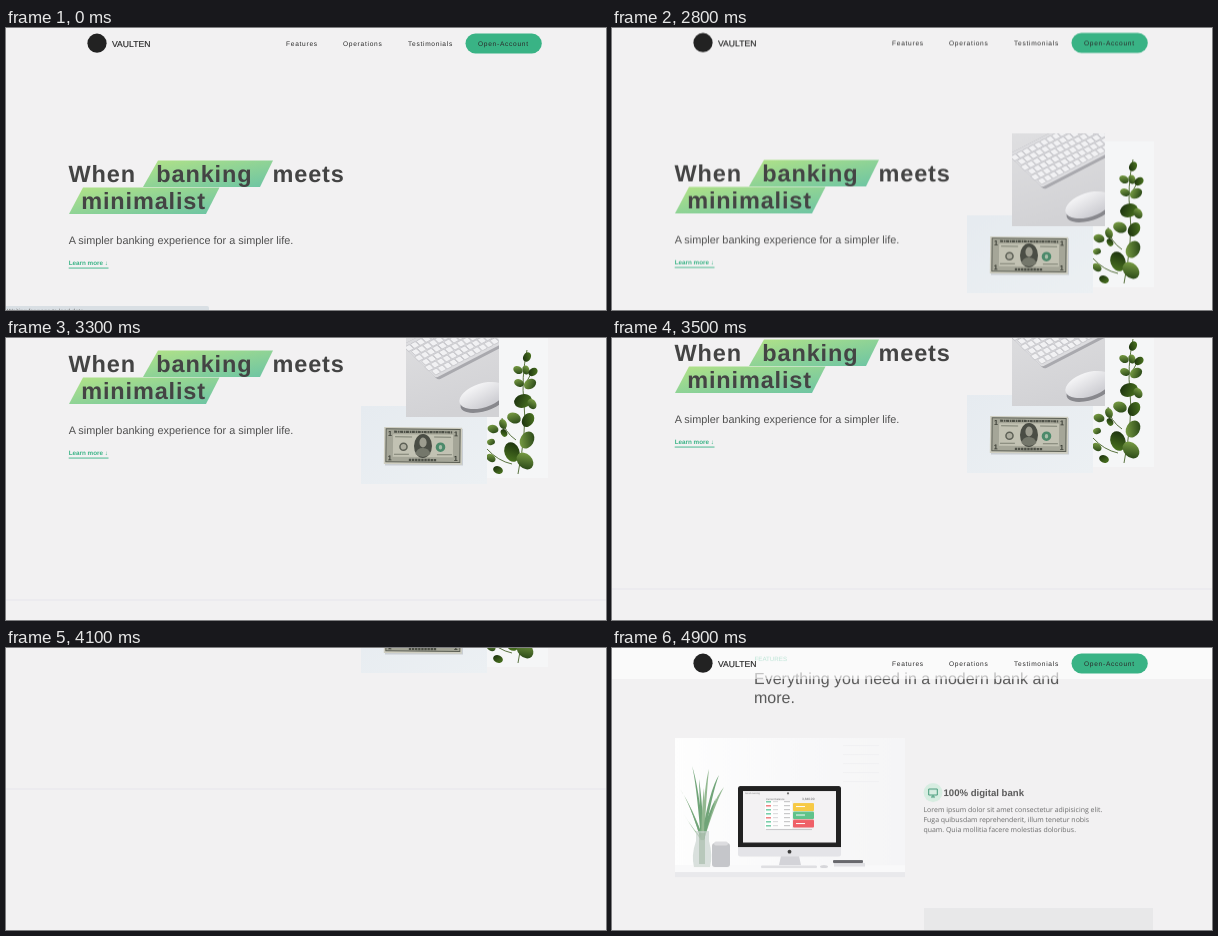
An HTML page for the animation above (5100 ms loop, 600 px wide and 282 px high).

```html
<!DOCTYPE html>
<html lang="en">
<head>
<meta charset="utf-8">
<title>Minimalist banking</title>
<style>
  html, body { margin: 0; width: 100%; height: 100%; overflow: hidden; background: #f2f1f2; }
  #stage { display: block; width: 100%; height: 100%; }
  text { font-family: "Liberation Sans", Arial, sans-serif; text-rendering: geometricPrecision; }
  .lorem { font-family: "Open Sans", "Noto Sans", sans-serif; }
  .bold { font-weight: 700; }
  .menu { letter-spacing: .72px; }
  .title { font-weight: 700; letter-spacing: .85px; }
</style>
</head>
<body>
<svg id="stage" viewBox="0 0 600 282"></svg>
<script>
const LOOP = 5100;
const GREEN = '#39b385';
const INK = '#444';

// Drawing helpers
const rect = (x, y, w, h, fill, more = '') =>
  `<rect x="${x}" y="${y}" width="${w}" height="${h}" fill="${fill}" ${more}/>`;
const oval = (x, y, rx, ry, fill, more = '') =>
  `<ellipse cx="${x}" cy="${y}" rx="${rx}" ry="${ry}" fill="${fill}" ${more}/>`;
const path = (d, fill, more = '') => `<path d="${d}" fill="${fill}" ${more}/>`;
const line = (d, color, width = 1, more = '') =>
  path(d, 'none', `stroke="${color}" stroke-width="${width}" ${more}`);
const text = (x, y, size, fill, str, cls = '', more = '') =>
  `<text x="${x}" y="${y}" font-size="${size}" fill="${fill}" class="${cls}" ${more}>${str}</text>`;
const photo = (x, y, w, h, body) =>
  `<svg x="${x}" y="${y}" width="${w}" height="${h}" viewBox="${x} ${y} ${w} ${h}">${body}</svg>`;
const gradient = (id, x2, y2, from, to) =>
  `<linearGradient id="${id}" x2="${x2}" y2="${y2}">
    <stop stop-color="${from}"/><stop offset="1" stop-color="${to}"/></linearGradient>`;
const times = (n, fn) => Array.from({ length: n }, (_, i) => fn(i)).join('');

const defs = `<defs>
  ${gradient('lime', 1, 1, '#b2e287', '#6cc4a4')}
  ${gradient('table', .3, 1, '#dfdfe1', '#d2d2d5')}
  ${gradient('paper', 1, 1, '#e6ebf0', '#ecf0f3')}
  ${gradient('wall', 1, 0, '#ffffff', '#f5f5f7')}
  ${gradient('mouse', .4, 1, '#fbfbfc', '#cfcfd4')}
  ${gradient('leaf', 1, 1, '#86ab4c', '#1d3a10')}
  ${gradient('shade', 1, .6, '#16290c', '#48701f')}
</defs>`;

function nav() {
  return oval(91, 15.2, 9.6, 9.6, '#222')
    + text(106, 18.6, 8.6, '#222', 'VAULTEN', '', 'stroke="#222" stroke-width=".15"')
    + rect(459.5, 5.5, 76.3, 20, GREEN, 'rx="10"')
    + [[280, 'Features'], [337, 'Operations'], [402, 'Testimonials'], [472, 'Open-Account']]
      .map(([x, label]) => text(x, 17.9, 6.6, '#2b2b2b', label, 'menu')).join('');
}

function keyboardPhoto() {
  const keys = times(6, row => times(17, col =>
    rect(2 + col * 6.6 - row % 2 * 2, 3 + row * 7, 5.8, 6, '#f1f1f3',
      'rx="1" stroke="#b4b4b9" stroke-width=".5"')));
  return photo(400, 106.5, 93, 92.5,
    rect(400, 106, 93, 93, 'url(#table)')
    + `<g transform="matrix(.887 -.46 -.72 -.7 430 160)">
        ${rect(0, -3, 120, 50, '#a9a9ae', 'rx="3"')}${rect(0, 0, 120, 47, '#dcdcdf', 'rx="3"')}${keys}</g>`
    + oval(478, 182, 24.5, 11, '#88888d', 'transform="rotate(-18 478 182)"')
    + oval(476.5, 177.5, 24, 12, 'url(#mouse)', 'transform="rotate(-18 476.5 177.5)"'));
}

function billPhoto() {
  const ones = [[381.8, 218], [447.8, 218], [381.8, 242.5], [447.8, 242.5]]
    .map(([x, y]) => text(x, y, 7, '#34372f', '1', 'bold')).join('');
  const bill = rect(378, 209.3, 78, 37, '#cfcec1')
    + rect(380, 211.2, 74, 33, '#a5a698', 'stroke="#5d6056" stroke-width="1"')
    + rect(387, 216.5, 60, 22.5, '#c2c2b3')
    + line('M388 214H446', '#4d5047', 2.2, 'stroke-dasharray="3 .8 1.5 .6"')
    + line('M403 242H431', '#4d5047', 2.4, 'stroke-dasharray="2.4 .7"')
    + line('M389 219H406M428 219H445M388 236.5H403M431 236.5H446', '#7d8073')
    + ones
    + oval(397.5, 229, 4.3, 4.3, '#5d6056') + oval(397.5, 229, 2.8, 2.8, '#aeaea0')
    + oval(434.5, 229, 4.8, 4.8, '#4c8a6b') + oval(434.5, 229, 1.7, 2.3, '#a8bda9')
    + oval(417, 228, 9, 12, '#4a4d45')
    + oval(417, 224.5, 3.6, 5, '#9c9c8f')
    + path('M409.5 236 Q411 230 417 230 T424.5 236 Q417 242 409.5 236Z', '#74776b');
  return photo(355, 188, 126, 78,
    rect(355, 188, 126, 78, 'url(#paper)')
    + rect(379, 211, 78, 36.5, '#c9ced4')
    + `<g transform="rotate(.6 417 228)">${bill}</g>`);
}

function plantPhoto() {
  // x, y, half length, angle
  const leaves = [
    [521, 139, 5, -60], [512, 152, 5, 30], [520, 152, 4.5, 70], [527, 154, 5, -35],
    [513, 165, 5, 20], [524, 166, 6.5, -30], [517, 183, 9, -15], [526, 186, 5.5, 60],
    [508, 200, 7, 20], [522, 202, 7.5, -55], [497, 206, 5, 70], [487, 211, 5.5, 15],
    [498, 215, 4, 60], [485, 224, 4, -15], [521, 222, 9, -60], [506, 234, 10, 70],
    [519, 243, 9.5, 45], [485, 240, 5, 40], [492, 252, 5, 20]];
  return photo(480, 114, 61.5, 146,
    rect(480, 114, 62, 146, '#f5f6f7')
    + line('M521 132 Q515 160 518 185 T512 256 M510 222 Q498 214 496 200 M506 246 Q492 243 481 231 M520 165 L528 150',
      '#5a7340', 1)
    + leaves.map(([x, y, r, a], i) =>
      oval(x, y, r, r * .75, i % 3 ? 'url(#leaf)' : 'url(#shade)', `transform="rotate(${a} ${x} ${y})"`)).join(''));
}

function hero() {
  return path('M152 132.5H267L254 159H137Z', 'url(#lime)')
    + path('M77 159.5H213.5L200 186H63Z', 'url(#lime)')
    + text(62.5, 154, 23.5, INK, 'When', 'title')
    + text(150.3, 154, 23.5, INK, 'banking', 'title')
    + text(266.5, 154, 23.5, INK, 'meets', 'title')
    + text(75.2, 181, 23.5, INK, 'minimalist', 'title')
    + text(62.7, 215.6, 10.87, '#505050', 'A simpler banking experience for a simpler life.')
    + text(62.7, 236.7, 6.3, GREEN, 'Learn more ↓', 'bold')
    + rect(62.7, 239.6, 39.8, .9, GREEN)
    + plantPhoto() + billPhoto() + keyboardPhoto()
    + rect(0, 381.5, 600, 1, '#e6e6eb');
}

function deskPhoto() {
  const tips = [[80, 118], [97, 121], [107, 127], [68, 141], [74, 151], [112, 139],
    [87, 131], [71, 165], [104, 150], [92, 140]];
  const grass = tips.map(([x, y], i) => {
    const bend = y + 14;
    return path(`M89 192Q${(x + 88) / 2} ${bend} ${x} ${y}Q${(x + 93) / 2} ${bend + 4} 92 192Z`,
      i % 2 ? '#86b184' : '#5f9a68');
  }).join('');
  const rows = times(7, i => {
    const y = 153 + i * 4;
    return rect(154, y, 5, 1.5, i % 3 == 1 ? '#ef6a6a' : '#5fc79a') + rect(161, y + .3, 5, .8, '#c8c8cb')
      + rect(172, y + .3, 6, .8, '#a5a5a9');
  });
  return photo(63, 90, 230, 138.5,
    rect(63, 90, 230, 139, 'url(#wall)')
    + times(5, i => rect(231, 97 + i * 9, 36, .6, '#eeeef1'))
    + rect(63, 217, 230, 12, '#fafafb') + rect(63, 224, 230, 5, '#e8e8eb')
    + grass
    + path('M84 183H97V193Q101 207 98 219H82Q79 207 84 193Z', '#c5d0ca', 'fill-opacity=".7"')
    + rect(87, 185, 6, 31, '#8ca78e', 'opacity=".5"')
    + rect(100, 195, 18, 24, '#bfc0c4', 'rx="3"') + rect(102, 193.5, 14, 4, '#d9d9dc', 'rx="2"')
    + path('M169 208H187L189 217H167Z', '#cfcfd4')
    + rect(126, 138, 103, 70.5, '#e2e2e6', 'rx="2.5"')
    + path('M128.5 138H226.5Q229 138 229 140.5V199H126V140.5Q126 138 128.5 138Z', '#050505')
    + rect(131, 143, 93, 51.5, '#f3f2f3')
    + oval(177.5, 203.7, 1.9, 1.9, '#222')
    + text(133, 146.2, 2.4, '#666', 'Good evening') + oval(176, 145.3, 1.1, 1.1, '#555')
    + text(154, 152, 2.6, '#555', 'Current balance') + text(190, 152.2, 3.2, '#444', '3,840.00')
    + rect(153, 152.8, 27, 28, '#fff') + rows
    + rect(181, 155, 21, 8, '#f7c52e', 'rx="1"') + rect(181, 163.4, 21, 7.7, '#4cbd7c', 'rx="1"')
    + rect(181, 171.5, 21, 8, '#ee4d55', 'rx="1"')
    + rect(184, 158, 9, 1, '#fff') + rect(184, 166.5, 9, 1, '#fff') + rect(184, 175, 9, 1, '#fff')
    + rect(154, 181, 46, .8, '#b5b5b8')
    + rect(149, 217.5, 56, 2.5, '#dcdce0', 'rx="1"') + oval(212, 218.5, 4, 1.6, '#d2d2d7')
    + rect(221, 212, 30, 3, '#55565b', 'rx="1"') + rect(222, 215, 31, 3.5, '#dedee2'));
}

function features() {
  return text(142.5, 12.7, 6.2, GREEN, 'FEATURES')
    + text(142, 36, 16, INK, 'Everything you need in a modern bank and')
    + text(142, 54.7, 16, INK, 'more.')
    + deskPhoto()
    + oval(321, 144.5, 9.4, 9.4, '#d3ecdf')
    + line('M316.7 141H325.3V147H316.7ZM319 149H323M321 147V149', '#2f8f6b', 1)
    + text(331.5, 147.6, 9.6, INK, '100% digital bank', 'bold')
    + ['Lorem ipsum dolor sit amet consectetur adipisicing elit.',
      'Fuga quibusdam reprehenderit, illum tenetur nobis',
      'quam. Quia mollitia facere molestias doloribus.']
      .map((str, i) => text(311.5, 164 + i * 10, 6.94, '#585858', str, 'lorem')).join('')
    + rect(312, 260, 229, 138, '#e6e6e8');
}

const stage = document.getElementById('stage');
stage.innerHTML = defs
  + rect(0, 0, 600, 282, '#f2f1f2')
  + `<g id="page">${nav()}${hero()}</g>
     <g id="features">${features()}</g>
     <g id="sticky">${rect(0, 0, 600, 31, '#fff', 'fill-opacity=".62"')}${nav()}</g>
     <g id="status">${rect(-3, 278, 206, 8, '#d9dfe4', 'rx="2"')}
       ${text(1, 284.6, 6, '#666', 'Waiting for page to load data')}</g>`;
const photos = stage.querySelectorAll('#page svg');

// Scroll position over time: two wheel ticks, then a longer roll
const wheel = [.6, 11, 34, 65, 97, 120];
const scroll = [
  [0, 0],
  ...wheel.map((d, i) => [2800 + i * 100, d]),
  ...wheel.map((d, i) => [3400 + i * 100, 120 + d]),
  ...[241, 249, 266, 288, 312, 336, 365, 410, 452].map((y, i) => [4100 + i * 100, y])
];

// Solves the standard CSS "ease" curve
function ease(x) {
  if (x <= 0) return 0;
  if (x >= 1) return 1;
  let lo = 0, hi = 1, s = .5;
  for (let i = 0; i < 30; i++) {
    s = (lo + hi) / 2;
    if (.75 * s * (1 - s) + s ** 3 < x) lo = s; else hi = s;
  }
  return .3 * s * (1 - s) ** 2 + 3 * s * s * (1 - s) + s ** 3;
}

// Plays [ms, style] rows with hard cuts between them
const start = document.timeline.currentTime ?? 0;
function play(el, rows) {
  const frames = [...rows, [LOOP, rows[rows.length - 1][1]]]
    .map(([ms, style]) => ({ ...style, offset: ms / LOOP, easing: 'steps(1, end)' }));
  el.animate(frames, { duration: LOOP, iterations: Infinity }).startTime = start;
}
const byId = id => document.getElementById(id);
const shift = y => `translate(0px, ${y.toFixed(2)}px)`;

play(byId('page'), scroll.map(([ms, y]) => [ms, { transform: shift(-y) }]));
play(byId('features'), scroll.map(([ms, y]) => {
  const shown = ease((ms - 4300) / 1000);
  return [ms, { transform: shift(448 + 35 * (1 - shown) - y), opacity: shown }];
}));
play(byId('sticky'), [[0, { opacity: 0 }], [4700, { opacity: 1 }]]);
play(byId('status'),
  [[0, 1], [400, .67], [500, .33], [600, 0]].map(([ms, opacity]) => [ms, { opacity }]));
photos.forEach(el => play(el, [[0, { opacity: 0 }], [100, { opacity: 1 }]]));
</script>
</body>
</html>
```
